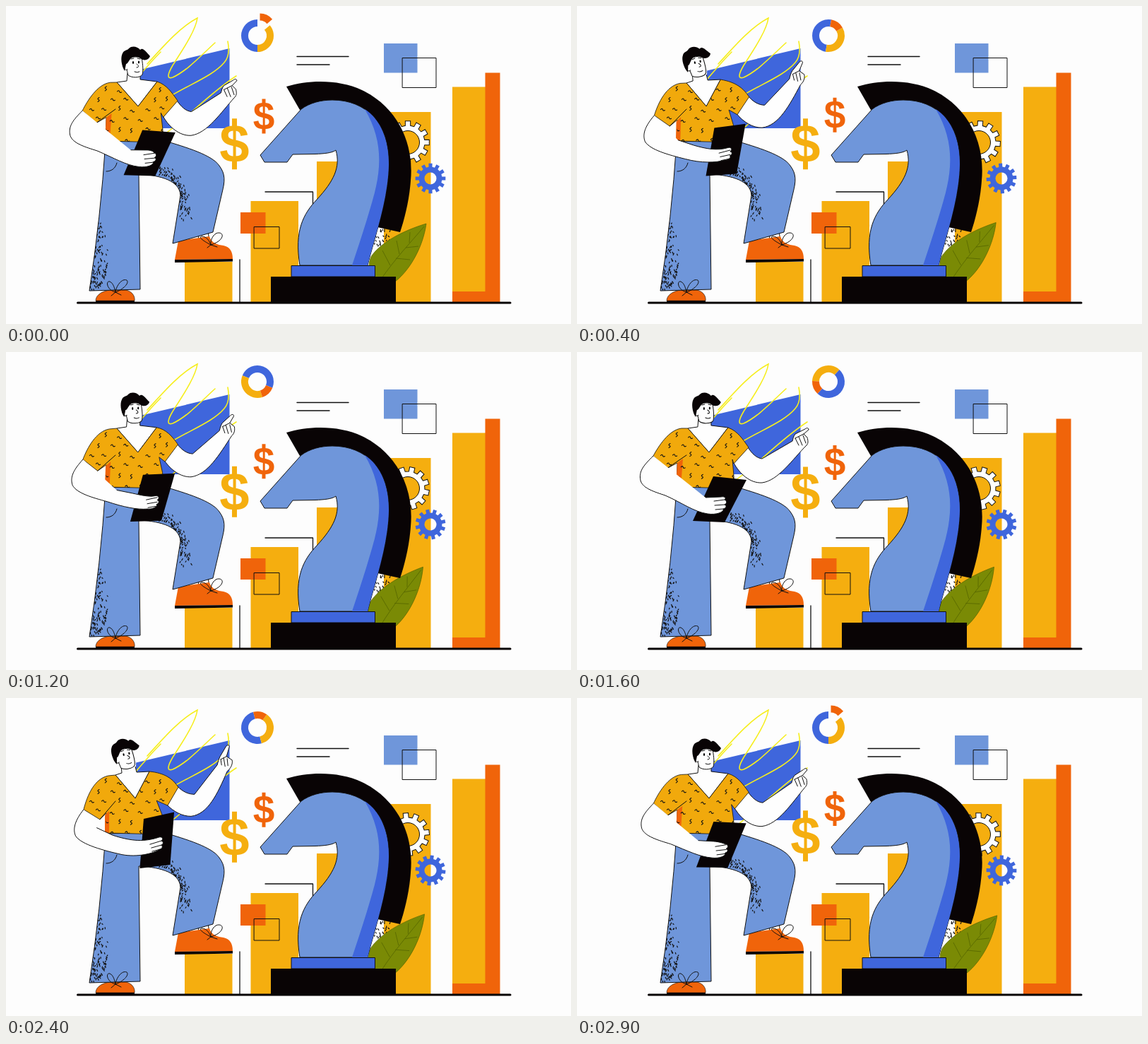
Recreate the animation shown at these times as an HTML page. Size 800 by 450 pixels, loop 3 s.

```html
<!DOCTYPE html>
<html lang="en">
<head>
<meta charset="utf-8">
<title>Strategy</title>
<style>
html, body { margin: 0; width: 100%; height: 100%; overflow: hidden; background: #fdfdfd; }
svg { display: block; width: 100%; height: 100%; }
text { font-family: "Liberation Sans", Arial, sans-serif; font-weight: 700; text-anchor: middle; }
.line { fill: none; stroke: #111; stroke-width: 1; stroke-linecap: round; stroke-linejoin: round; }
.skin { fill: #fefefe; stroke: #111; stroke-width: 1; stroke-linejoin: round; }
.jeans { fill: #6f96da; stroke: #111; stroke-width: 1; stroke-linejoin: round; }
.gold { fill: #f5ae0f; }
.orange { fill: #f0640a; }
.royal { fill: #3f66dc; }
.ink { fill: #090405; }
.speck { fill: none; stroke: #111; stroke-width: 1.2; stroke-linecap: round; }
</style>
</head>
<body>
<svg viewBox="0 0 800 450">
  <defs>
    <clipPath id="shirtClip"><path id="shirtMask"/></clipPath>
    <clipPath id="legClip"><path id="legMask"/></clipPath>
  </defs>

  <path class="royal" d="M184 91.500L316.500 60V173H200L184 105Z"/>
  <g fill="none" stroke="#f6ee1e" stroke-width="1.6" stroke-linecap="round">
    <path d="M184 104C196 90 206 78 219 65"/>
    <path d="M200 82C222 58 246 30 271 17C268 36 250 62 236 84C229 96 227 104 236 101C256 92 274 72 296 52"/>
    <path d="M232 128C262 110 294 98 309 80C316 72 316 60 314 50"/>
    <path d="M225 181C250 164 290 122 326 99"/>
  </g>

  <g id="donut">
    <path id="blueArc" class="royal"/>
    <path id="goldArc" class="gold"/>
    <path id="orangeArc" class="orange"/>
  </g>

  <path class="line" style="stroke-width:1.4" d="M412 71.500H485M412 83H458"/>
  <path fill="#6f96da" d="M535 53h47.500v41.500h-47.500z"/>
  <path class="line" d="M561.5 73.5h47.5v42h-47.5z"/>

  <path class="gold" d="M253 362h67.500v57h-67.500zM346.500 276h67.500v143h-67.500zM440 220h62v100h-62zM535 150h66.500v269h-66.500zM632 114.500h47v305h-47z"/>
  <path class="orange" d="M678.500 94.500H699.500V419H632V404H678.500z"/>
  <path class="line" style="stroke-width:1.3" d="M367 263H434.500V292M331 359V419"/>
  <path class="orange" d="M332 292h35.500v30h-35.500z"/>
  <path class="line" d="M351.500 312.500h35.500v30.500h-35.500z"/>

  <g transform="translate(569 193)">
    <path id="bigGear" fill="#fefefe" stroke="#111"/>
    <circle r="16.500" class="gold" stroke="#111"/>
  </g>
  <path id="smallGear" class="royal" fill-rule="evenodd"/>

  <path id="knightSpecks" class="speck"/>
  <g id="leaf">
    <path fill="#7a8a05" stroke="#566600" stroke-width=".7" d="M595 308C562 318 532 334 518 353C511 365 514 384 522 390H551C574 372 591 338 595 308Z"/>
    <path fill="none" stroke="#566600" stroke-width=".8" d="M592 312C572 336 552 356 530 388M571 335L572 320M557 351L553 332M544 367L533 346M566 342L584 340M552 357L572 359"/>
  </g>

  <path class="ink" d="M397 114C430 104 472 104 504 119C556 144 578 196 573 247C571 276 564 302 558 320L526 313L540 220L500 150L450 134L416 147Z"/>
  <path class="jeans" d="M360 211L418 146C430 137 446 133 462 133C510 133 543 166 542 224C541 275 522 326 512 367H416C408 318 421 294 440 274C464 248 474 228 467 204C462 208 450 209 438 209.500L406 210L398 221H366Z"/>
  <path class="royal" d="M508 146C531 161 542 190 542 224C541 275 522 326 512 367H490C499 340 509 310 519 275C532 230 534 190 508 146Z"/>
  <path class="royal" stroke="#111" d="M404 367.500h118.500V383H404z"/>
  <path class="ink" d="M375 383h177v37H375z"/>

  <g id="bigDollar" class="gold">
    <text font-size="76" y="26">$</text>
    <path d="M-3.500 -36h7v12h-7zM-3.500 24h7v12h-7z"/>
  </g>
  <g id="smallDollar" class="orange">
    <text font-size="55" y="19">$</text>
    <path d="M-2.500 -24.500h5v8h-5zM-2.500 16.500h5v8h-5z"/>
  </g>

  <path stroke="#090405" stroke-width="3" stroke-linecap="round" d="M101.500 420H714"/>

  <path class="skin" d="M272 325L286 318L288 334H274Z"/>
  <path class="orange" stroke="#111" stroke-width=".6" d="M127 417C127 408 138 403 147 402H170C179 404 183 411 182 417Z"/>
  <path class="orange" d="M244 332L288 326C291 336 300 338 308 339C317 341 321 347 321 358L239 359Z"/>
  <path class="ink" d="M127 417H182V419H127ZM239 359L321 358V361.500L239 363Z"/>

  <path id="leg" class="jeans"/>
  <g clip-path="url(#legClip)"><path id="legSpecks" class="speck"/></g>
  <path class="line" d="M157 222C155 230 149 234 142 234"/>
  <path class="line" d="M155 405C142 402 141 388 147 390C152 392 154 400 155 405C156 396 164 385 171 388C175 392 166 401 155 405L149 410M155 405L163 409"/>
  <path class="line" d="M290 338C282 334 271 327 277 326C284 326 288 332 290 338C289 330 295 320 302 321C310 322 307 333 290 338L285 342M290 338L299 341"/>

  <path id="neck" class="skin"/>
  <path id="rightArm" class="skin"/>
  <path id="rightFingers" class="line"/>
  <path id="shirt" fill="#f1a90c" stroke="#111" stroke-width=".8" stroke-linejoin="round"/>
  <path id="strip" class="orange"/>
  <g clip-path="url(#shirtClip)"><path id="squiggles" class="line" style="stroke-width:1.1"/></g>
  <path id="fold" class="line"/>
  <path id="tablet" class="ink"/>
  <path id="leftArm" class="skin"/>
  <path id="leftFingers" class="line"/>

  <g id="head">
    <path class="skin" d="M171 72C169 82 171 91 173 98C178 102 190 102 193 97C195 90 193 79 192 72Z"/>
    <path class="skin" d="M171 81C166 78 164 84 167 88C169 91 171 91 172 89"/>
    <path class="ink" d="M168 92C163 84 162 72 165 67C167 62 172 63 174 60C178 56 186 57 190 62C194 58 198 65 204 71C202 77 195 78 190 74C184 70 179 72 176 75C173 79 172 82 170 82Z"/>
    <ellipse cx="180" cy="80" rx="1.100" ry="1.900"/>
    <ellipse cx="188" cy="79.500" rx="1.100" ry="1.900"/>
    <path class="line" d="M185 82C188 84 189 87 185 87M182 93Q186 95 189 93M177 75L181 74M186 74L190 75"/>
  </g>
</svg>

<script>
const LOOP = 3000, STEP = 1500;
const $ = id => document.getElementById(id);
const setD = (id, d) => $(id).setAttribute("d", d);
const move = (id, value) => $(id).setAttribute("transform", value);

// Monotone cubic through [time, value] points
function curve(points, t) {
  const rate = k => (points[k][1] - points[k - 1][1]) / (points[k][0] - points[k - 1][0]);
  const slope = k => {
    if (k === 0 || k === points.length - 1) return 0;
    const a = rate(k), b = rate(k + 1);
    return a * b <= 0 ? 0 : 2 * a * b / (a + b);
  };
  let i = 1;
  while (i < points.length - 1 && t > points[i][0]) i++;
  const [x0, y0] = points[i - 1], [x1, y1] = points[i];
  const w = x1 - x0, u = Math.min(1, Math.max(0, (t - x0) / w)), v = 1 - u;
  return y0 * v * v * (1 + 2 * u) + y1 * u * u * (3 - 2 * u)
    + w * u * v * (slope(i - 1) * v - slope(i) * u);
}

// Blend two path strings of the same structure
function mix(a, b, p) {
  const ends = b.match(/[\d.]+/g);
  let i = 0;
  return a.replace(/[\d.]+/g, n => (+n + (ends[i++] - n) * p).toFixed(2));
}

function ringPart(from, to) {
  const at = (r, deg) => {
    const a = deg * Math.PI / 180;
    return `${(r * Math.sin(a)).toFixed(2)} ${(-r * Math.cos(a)).toFixed(2)}`;
  };
  return `M${at(23, from)}A23 23 0 0 1 ${at(23, to)}L${at(13, to)}A13 13 0 0 0 ${at(13, from)}Z`;
}

function gear(outer, inner, teeth) {
  let d = "";
  for (let i = 0; i < teeth; i++) {
    [[-.29, inner], [-.23, outer], [.23, outer], [.29, inner]].forEach(([o, r]) => {
      const a = (i + o) * 2 * Math.PI / teeth;
      d += `${d ? "L" : "M"}${(r * Math.sin(a)).toFixed(2)} ${(-r * Math.cos(a)).toFixed(2)}`;
    });
  }
  return d + "Z";
}

let seed = 7;
function rand() {
  seed = (seed * 16807) % 2147483647;
  return seed / 2147483647;
}
function fleck(x, y) {
  return `M${x.toFixed(1)} ${y.toFixed(1)}l${(rand() * 3 - 1.5).toFixed(1)} ${(1 + rand() * 1.5).toFixed(1)}`;
}
function many(count, make) {
  return Array.from({ length: count }, make).join("");
}

function build() {
  const leg = "M141 192L222 190C256 200 292 211 302 226C311 238 310 248 306 264L293 320L236 336"
    + "L247 268C246 244 210 239 188 238L190 401L118 403Q134 300 141 192Z";
  setD("leg", leg);
  setD("legMask", leg);
  setD("blueArc", ringPart(180, 360));
  setD("goldArc", ringPart(50, 180));
  setD("orangeArc", ringPart(0, 50));
  setD("bigGear", gear(30.5, 24, 12));
  setD("smallGear", gear(21.5, 16.5, 12) + "M-8.500 0a8.500 8.500 0 1 0 17 0a8.500 8.500 0 1 0 -17 0Z");

  const shin = many(110, () => {
    const u = rand(), y = 307 + 94 * u;
    return fleck(118 + (403 - y) * .13 + rand() * (4 + 18 * Math.sin(u * 2.6)), y);
  });
  const thigh = many(105, () => {
    const u = rand(), v = 1 - u, s = 20 * rand() * Math.sqrt(rand());
    const x = 216 * v * v + 2 * u * v * 252 + 246 * u * u;
    const y = 238 * v * v + 2 * u * v * 240 + 304 * u * u;
    return fleck(x + s * u, y - s * v);
  });
  setD("legSpecks", shin + thigh);
  setD("knightSpecks", many(34, () => fleck(521 + rand() * 24, 315 + rand() * 25)));

  let d = "";
  for (let row = 0; row < 6; row++) {
    for (let col = 0; col < 7; col++) {
      const x = 115 + col * 20 + (row % 2) * 10 + rand() * 5, y = 116 + row * 14 + rand() * 5;
      d += rand() < .5
        ? `M${x} ${y}q2.500 -2.500 3 0t3 1`
        : `M${x + 3} ${y - 3}q-3.500 2 -1 3t-1 3`;
    }
  }
  setD("squiggles", d);
}

const armKeys = [[-100, .19], [0, .1], [100, 0], [400, .71], [850, 1], [1200, .46], [1400, .19], [1500, .1], [1600, 0]];
const headKeys = [[0, 0], [80, 0], [400, .98], [550, 1], [900, 1], [1200, .06], [1300, 0], [1500, 0]];
const spinKeys = [[0, 0], [250, 0], [400, 10], [800, 49], [1200, 112], [1600, 222], [2400, 345], [2680, 360], [3000, 360]];
const burstKeys = [[0, 1], [60, 1], [320, 0], [2600, 0], [2850, 1], [3000, 1]];
const leafKeys = [[0, 0], [400, .4], [800, .8], [1250, 1], [1550, 1], [2400, .55], [2900, .05], [3000, 0]];

function drawMan(t) {
  const arm = curve(armKeys, t % STEP), nod = curve(headKeys, t % STEP);

  move("head", `translate(${-10 * nod} ${-nod}) rotate(${-10 * nod} 185 100)`);
  setD("neck", mix(
    "M172 95L171 106L157 108L187 142L214 107L190 104L190 95",
    "M163 95L164 106L155 109L183 142L203 104L185 105L183 97", nod));

  const shirt = mix("M157 108L187 142L214 107", "M155 109L183 142L203 104", nod) + mix(
    "C228 112 235 124 243 135L222 158L220 152L222 175L223 193L141 191L142 157L127 165L108 147C115 134 130 110 148 108Z",
    "C225 106 236 114 244 126L229 152L213 145L221 165L224 193L141 191L142 163L133 172L110 158C115 138 125 114 145 110Z", arm);
  setD("shirt", shirt);
  setD("shirtMask", shirt);
  setD("strip", mix("M142 157L150 151L147 191L140 190Z", "M140 166L146 160L146 191L140 190Z", arm));
  setD("fold", mix("M127 165L155 146", "M133 172L155 146", arm));

  setD("rightArm", mix(
    "M222 157C230 172 245 186 262 185C285 182 305 152 325 132C328 129 327 125 326 121L321 116"
    + "L328 110C328 107 325 107 323 109L309 116C306 120 306 123 305 126L262 151C254 150 248 144 242 135Z",
    "M228 151C238 161 250 167 262 167C286 164 299 136 313 103C319 98 321 92 320 87L312 82"
    + "L316 68C316 65 313 65 311 68L303 82C301 86 300 90 299 94L267 136C258 136 250 132 243 125Z", arm));
  setD("rightFingers", mix(
    "M309 122L314 132M314 120L319 132M320 118L324 129M309 122L321 116",
    "M304 86L305 94M308 84L310 96M313 85L314 95M304 86L312 82", arm));

  setD("tablet", mix(
    "M193 176L240 181L209 241L164 239Z",
    "M195 171L238 161L233 236L190 241Z", arm));
  setD("leftArm", mix(
    "M108 147C95 160 87 168 90 182C93 193 110 198 125 203C150 214 165 226 185 229C198 231 209 226 207 222"
    + "C212 221 212 217 209 216C213 214 212 210 209 209C212 206 208 204 204 205L182 206C165 200 148 193 122 179L127 165Z",
    "M110 158C98 173 94 186 99 196C108 208 138 216 165 222C186 226 210 220 218 214"
    + "C222 213 223 209 220 208C224 206 223 202 220 202C224 199 221 195 216 197L192 205C172 201 150 194 127 183L133 172Z", arm));
  setD("leftFingers", mix(
    "M209 209L194 211M209 216L195 217M207 222L196 223",
    "M220 202L204 207M220 208L206 212M218 214L207 217", arm));
}

function draw(t) {
  const turn = 2 * Math.PI * t / LOOP;
  drawMan(t);

  const burst = curve(burstKeys, t);
  move("donut", `translate(356 42) rotate(${curve(spinKeys, t)})`);
  move("orangeArc", `translate(${3.5 * burst} ${-8.5 * burst})`);
  move("leaf", `rotate(${-3.2 * curve(leafKeys, t)} 525 388)`);

  const spin = 30 * t / LOOP;
  move("bigGear", `rotate(${spin})`);
  move("smallGear", `translate(601 244) rotate(${-spin})`);

  move("bigDollar", `translate(323.500 ${196.8 - 1.7 * Math.cos(turn - .3)})`);
  move("smallDollar", `translate(365 ${156 - 2.3 * Math.sin(turn)})`);
}

function tick() {
  draw(performance.now() % LOOP);
  requestAnimationFrame(tick);
}

build();
tick();
</script>
</body>
</html>
```
